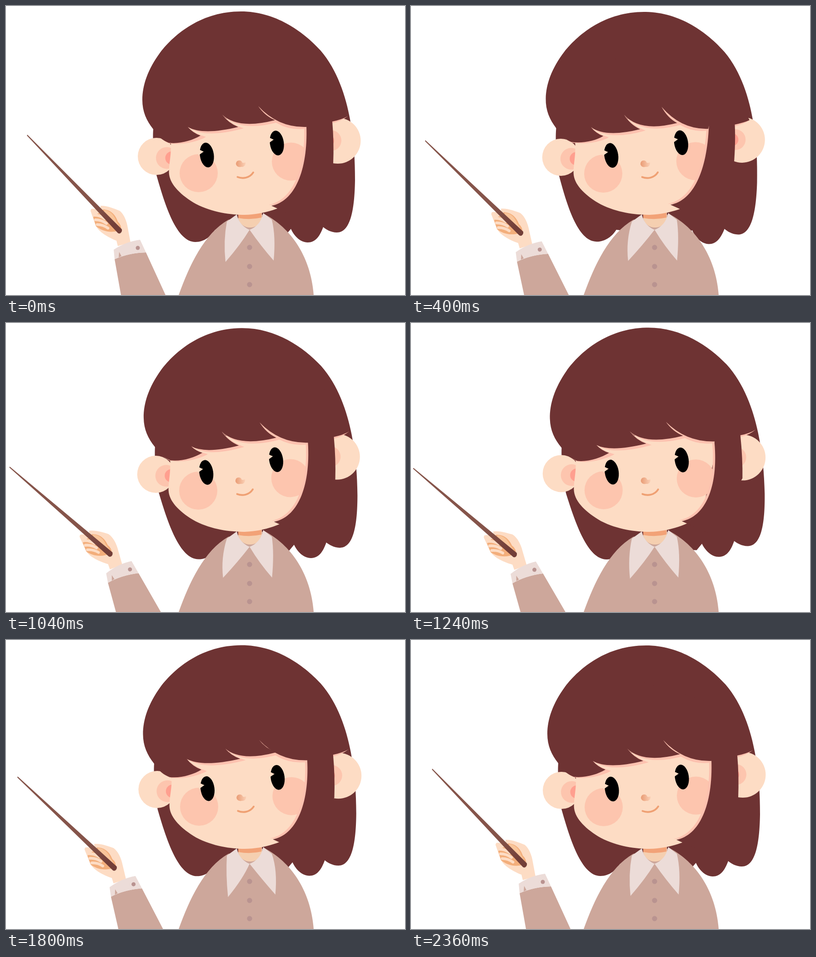
Write an HTML page with a canvas that moves like this. It is 878 px wide and 638 px high and loops after 2400 ms.

```html
<!DOCTYPE html>
<html lang="en">
<head>
<meta charset="utf-8">
<title>Teacher with pointer</title>
<style>
html, body { margin: 0; width: 100%; height: 100%; overflow: hidden; background: #fff; }
canvas { display: block; }
</style>
</head>
<body>
<canvas id="stage" width="878" height="638"></canvas>
<script>
const ctx = document.getElementById('stage').getContext('2d');
const LOOP = 2400, STEP = 40, RAD = Math.PI / 180;
const C = {
  hair: '#6e3333', skin: '#fddcc4', blush: '#fdc5ae', shade: '#fdc1af', ear: '#ff9f8f',
  neck: '#f5cfb0', orange: '#f2a277', cloth: '#cda79b', collar: '#ecdcd8', button: '#b99390'
};

// Piecewise linear value over [time, value] keys
function track(keys, t) {
  let i = 1;
  while (i < keys.length - 1 && t > keys[i][0]) i++;
  const [t0, a] = keys[i - 1], [t1, b] = keys[i];
  return a + (b - a) * (t - t0) / (t1 - t0);
}
const armAngle = t => -0.005 * (1180 - Math.abs(t - 1180));
const headAngle = t => track([[0, 0], [800, -1.17], [1630, 0.8], [2360, 0]], t);
const hairAngle = t => track([[0, 0], [500, 1.2], [1240, -1.55], [2000, 0], [2360, 0]], t);
// Short extra push on the loose hair while the head tilts left
const nudge = t => Math.exp(-(((t - 620) / 230) ** 2));

function hairPoint(x, y, t) {
  const a = hairAngle(t) * RAD, dx = x - 457;
  return [457 + dx * Math.cos(a) - y * Math.sin(a), dx * Math.sin(a) + y * Math.cos(a)];
}

// A loose strand rides on the hair, swings with the head and takes the nudge
const strand = (x, y, swing = [0, 0], push = [0, 0]) => t =>
  hairPoint(x, y, t).map((v, k) => v + swing[k] * headAngle(t) + push[k] * nudge(t));

const strands = {
  tip1: strand(428, 286, [0, 0], [0, 4]),
  gap1: strand(400, 267, [-7, -8], [-9, -8]),
  tip2: strand(511, 267, [4, -7]),
  gap2: strand(476, 240, [8, 0], [4, 0]),
  tip3: strand(592, 252, [1, -5], [-4, 3]),
  gap3: strand(555, 221),
  end: strand(661, 267, [0, 0], [-6, 2]),
  lock: strand(584, 441, [0, 0], [-14, -11]),
  lockBack: strand(720, 350, [0, 0], [-9, -8]),
  notch: strand(718, 255, [0, 0], [-3, 6]),
  notchTip: strand(751, 244, [0, 0], [-5, 8])
};

function fill(path, color) {
  ctx.fillStyle = color;
  ctx.fill(typeof path === 'string' ? new Path2D(path) : path);
}
function disc(x, y, r, color) {
  ctx.fillStyle = color;
  ctx.beginPath();
  ctx.arc(x, y, r, 0, 7);
  ctx.fill();
}
function line(path, width, color) {
  ctx.lineWidth = width;
  ctx.lineCap = 'round';
  ctx.strokeStyle = color;
  ctx.stroke(new Path2D(path));
}
function fade(x0, y0, x1, y1, from, to) {
  const g = ctx.createLinearGradient(x0, y0, x1, y1);
  g.addColorStop(0, from);
  g.addColorStop(1, to);
  return g;
}
function turned(x, y, degrees, draw) {
  ctx.save();
  ctx.translate(x, y);
  ctx.rotate(degrees * RAD);
  ctx.translate(-x, -y);
  draw();
  ctx.restore();
}

function backHair() {
  fill(`M517 12C592 12 653 55 692 98C729 141 748 200 757 250C766 300 768 340 768 385
    C767 450 758 500 728 500C715 500 704 493 698 488C690 510 680 522 664 522
    C648 522 634 508 627 492L615 506L545 502L460 494C452 508 436 521 417 521
    C375 521 350 440 331 373C326 340 322 300 324 272C309 253 300 233 300 207
    C300 175 312 140 339 103C372 60 432 12 517 12Z`, C.hair);
}

function ears() {
  disc(331, 332, 41, C.skin);
  disc(354, 335.5, 24, C.blush);
  disc(365, 335.5, 14.5, C.ear);
  disc(730, 297.5, 50.5, C.skin);
  disc(715, 297, 23, C.blush);
  disc(708, 297, 14, C.ear);
}

function torso(t) {
  fill('M380 638C404 571 436 503 489 472L570 460C625 490 670 550 677 638Z', C.cloth);
  fill('M511 450H563V468C560 482 549 489 537 489C525 489 514 482 511 468Z', C.neck);
  fill('M511 450H562V467Q537 473 511 468Z', C.orange);
  const swing = headAngle(t);
  const lx = 483 + 9 * swing, ly = 565 + 4 * swing, rx = 589 + 6 * swing;
  fill(`M508 460L486 476Q${lx - 5} 518 ${lx} ${ly}Q${lx + 33} 527 536 494
    C524 489 512 479 508 460Z`, C.collar);
  fill(`M566 457L585 472Q${rx + 5} 508 ${rx} 562Q${rx - 28} 530 536 494
    C550 489 562 477 566 457Z`, C.collar);
  for (const y of [533, 575, 615]) disc(536, y, 5.7, C.button);
}

function eye(x, y) {
  ctx.fillStyle = '#000';
  ctx.beginPath();
  ctx.ellipse(x, y, 15.3, 27.5, -8 * RAD, 0, 7);
  ctx.fill();
  fill(`M${x - 19} ${y - 13}L${x - 7} ${y - 7.5}L${x - 19} ${y + 1}Z`, C.skin);
}

function face() {
  fill(`M362 288C366 330 357 348 359 372C362 395 385 418 418 437C455 456 495 461 525 461
    C570 460 610 445 640 425L680 240L420 252Z`, C.skin);
  disc(424, 369, 42, C.blush);
  disc(627, 343.5, 42, C.blush);
  eye(442, 329);
  eye(596, 302.5);
  fill(`M513 341C517 341 519 343 520 346Q524 347 527 345C528 351 524 356 518 355
    C510 357 506 352 506 348Q507 341 513 341Z`, fade(506, 0, 528, 0, '#e99b74', '#fbd2b8'));
  line('M509.500 377.500C521 382 536 380 544 367.500', 4, '#efa073');
}

// Fringe and side lock; the shaded copy peeks out below, its hidden edges lie inside the hair
function fringe(t, shaded) {
  const s = shaded ? 1 : 0, p = {}, path = new Path2D();
  for (const name in strands) p[name] = strands[name](t);
  const to = (x, y) => path.lineTo(x, y);
  const h = (x, y) => hairPoint(x, y, t);
  const rise = ([x, y], [gx, gy]) =>
    path.quadraticCurveTo(x + (gx - x) * 0.6, y + (gy - y) * 0.3, gx, gy);
  const sweep = ([gx, gy], [x, y], along, drop) =>
    path.quadraticCurveTo(gx + (x - gx) * along, y + drop + 5 * s, x, y);

  path.moveTo(...h(324 + 10 * s, 272));
  path.bezierCurveTo(...h(335, 290), ...h(346, 297), ...h(358, 302 + s));
  const [tip1, tip2, tip3] = [p.tip1, p.tip2, p.tip3].map(([x, y]) => [x + 12 * s, y + 3 * s]);
  path.bezierCurveTo(...h(382, 305 + 3 * s), tip1[0] - 18, tip1[1] + 11, ...tip1);
  rise(tip1, p.gap1);
  sweep(p.gap1, tip2, 0.3, 19);
  rise(tip2, p.gap2);
  sweep(p.gap2, tip3, 0.3, 21);
  rise(tip3, p.gap3);
  sweep(p.gap3, [p.end[0] - 3 * s, p.end[1] + 4 * s], 0.42, 2);

  const [nx, ny] = p.notch, [bx, by] = p.lockBack, [ex, ey] = p.notchTip;
  const cx = nx - 57 - 5 * s, lx = p.lock[0] - 6 * s, ly = p.lock[1] - 2 * s;
  to(cx, 264);
  path.bezierCurveTo(cx + (bx - nx) * 2, 365, lx + 50, ly - 9, lx, ly);
  to(p.lock[0] + 62 - 30 * s, p.lock[1] + 28 - 30 * s);
  to(bx - 6 * s, by - 6 * s);
  path.quadraticCurveTo((bx + nx) / 2 + 3 - 6 * s, 300, nx, ny + 4 * s);
  path.quadraticCurveTo(nx + 20, ny - 4 + 3 * s, ex, ey);
  to(ex - 15 - 12 * s, ey - 30);
  const inset = 12 * s;
  to(...h(700 - inset, 150 + inset));
  to(...h(500, 90 + inset));
  to(...h(320 + inset, 190 + inset));
  path.closePath();
  fill(path, shaded ? C.shade : C.hair);
}

function arm() {
  fill('M239 559Q270 545 308 544L351 638L400 745H272L253 638Z', C.cloth);
  fill(`M208 441C222 440 240 448 250 452C260 460 266 476 268 490L274 522L246 530L243 518
    C225 511 204 499 197 484L186 452C188 447 199 447 208 451Z`, C.skin);
  fill('M214 449C232 450 242 463 246 476Q255 484 253 496L238 498C222 500 207 494 198 486L192 466Z', '#f3ae7b');
  fill('M216 450C230 452 238 462 242 474L250 488L215 457Z', '#f9c59a');
  for (let i = 0; i < 4; i++) {
    const x = 190 + 3.5 * i, y = 451 + 10.5 * i;
    line(`M${x} ${y}Q${x + 13} ${y} ${x + 24} ${y + 8}`, 6.8 - 0.3 * i, C.skin);
  }
  fill('M46 286L47 284L255 493Q256 499 251 502Q247 503 245 500Z',
    fade(190, 440, 235, 485, '#85544a', '#733f39'));
  fill('M237 538Q264 520 295 516L308 544Q270 545 239 559Z', C.collar);
  fill('M248 555L249 543L254 552Z', C.cloth);
  disc(290, 534, 4.5, C.button);
}

function draw(t) {
  ctx.fillStyle = '#fff';
  ctx.fillRect(0, 0, 878, 638);
  turned(457, 0, hairAngle(t), backHair);
  turned(522, 461, headAngle(t), ears);
  torso(t);
  turned(522, 461, headAngle(t), face);
  fringe(t, true);
  fringe(t, false);
  turned(391, 728, armAngle(t), arm);
}

const start = performance.now();
function tick() {
  const elapsed = Math.max(0, performance.now() - start) % LOOP;
  draw(Math.floor(elapsed / STEP) * STEP);
  requestAnimationFrame(tick);
}
tick();
</script>
</body>
</html>
```
